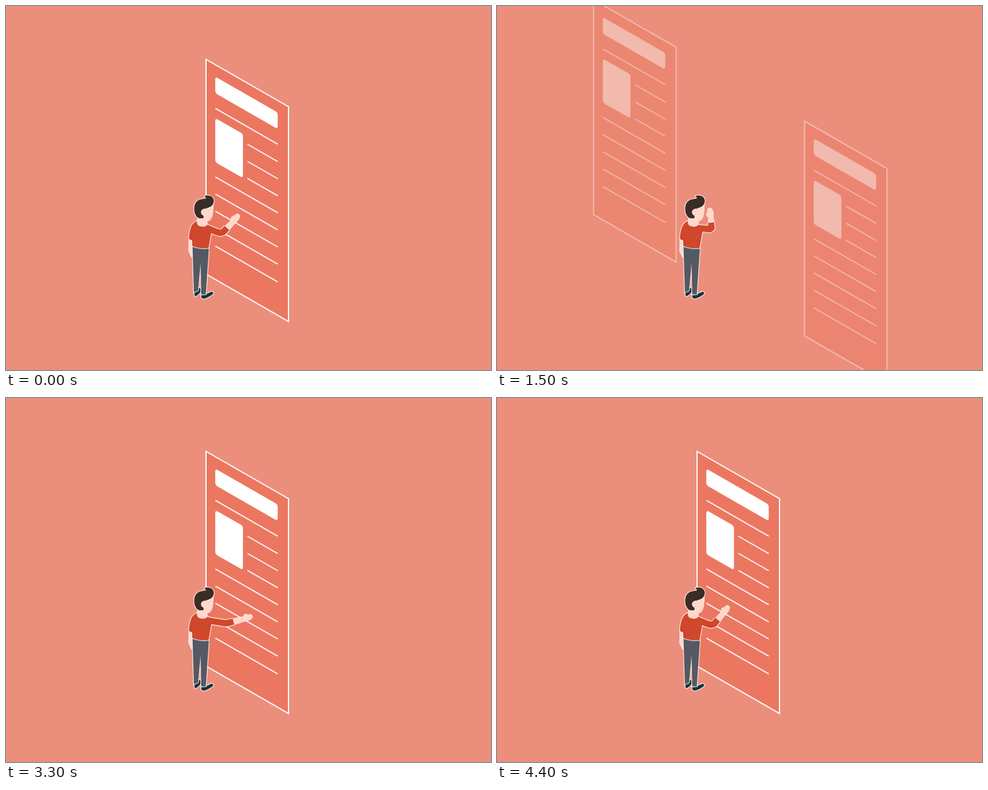
An HTML page that plays this animation: 800x600 px, repeating every 4500 ms.

```html
<!DOCTYPE html>
<html lang="en">
<head>
<meta charset="utf-8">
<title>Swiping pages</title>
<style>
  html, body { margin: 0; width: 100%; height: 100%; overflow: hidden; background: #eb8f7c; }
  svg { display: block; width: 100%; height: 100%; }
  .edge { stroke: #fff; stroke-opacity: .72; stroke-width: 2.6; stroke-linejoin: round; paint-order: stroke; }
  .sleeve { fill: none; stroke-linejoin: round; }
</style>
</head>
<body>
<svg viewBox="0 0 800 600">
  <defs>
    <g id="page" transform="matrix(1 .5735 0 1 330 88)">
      <path d="M0 0H136V354H0Z" fill="#eb7761" stroke="#fff" stroke-width="2" vector-effect="non-scaling-stroke"/>
      <rect x="15.2" y="19.7" width="103" height="27.3" rx="4" fill="#fff"/>
      <rect x="15.2" y="88" width="45.6" height="72.7" rx="4" fill="#fff"/>
      <g id="rules" stroke="#fff" stroke-opacity=".92" stroke-width="1.9" stroke-linecap="round"></g>
    </g>
  </defs>

  <use id="leaving" href="#page"/>
  <use id="coming" href="#page"/>

  <g>
    <path class="edge" fill="#ffd8cb" d="M302.5 384L302 404L306.5 413.5L308 412.5L307.5 386Z"/>
    <path class="edge" fill="#12343e" d="M310.3 473L317.5 464.5L321 465.5L321.3 471C318 475 315 478 311.8 478.6Z"/>
    <path class="edge" fill="#12343e" d="M322 476.5L330 475L339 471C342 470.5 342.5 474 340 476C335 479 330 482.5 325 482.3C322.5 481.8 321.8 479 322 476.5Z"/>
    <path class="edge" fill="#545963" d="M307.5 395C316 399 326 400 334.7 399L329.6 475.3L322 475.6L321 424L316.8 469L310 472Z"/>
    <path id="forearm" class="edge" fill="#ffd8cb"/>
    <path id="sleeveEdge" class="sleeve" stroke="#fff" stroke-opacity=".72" stroke-width="13"/>
    <path class="edge" fill="#d0472b" d="M315 354.5C306 357 302 370 302 384.5L307 386.5L307.2 395.5C316 399 326 400 334 399L338.5 374L341 366L331.5 359.5Z"/>
    <path id="sleeve" class="sleeve" stroke="#d0472b" stroke-width="10.4"/>
    <path class="edge" fill="#ffd8cb" d="M316 355L317 349L323 332L341 325C341.5 338 340 352 333 353.5L331 354L331.5 360C328 364 318 363.500 316 358Z"/>
    <path class="edge" fill="#3a2d27" d="M318.500 350C309 346 308 328 315 322C320 317.500 326 318.500 330 317L327.500 313C334 311 343 313.500 342.800 322C342 331 334 332 329.500 334C321 334 319 342 326 346L325.500 350Z"/>
    <path fill="#ffd8cb" d="M317 355L319 350.500L326 350L326 345.500C319.500 343 320.500 334.500 328 334.500L334 333L334 353L331 354L331.500 360C328 363.500 319 363 316.500 358Z"/>
  </g>
</svg>
<script>
const LOOP = 4500, STEP = 100;
const TRAVEL = 236, SLOPE = .5745;
const $ = id => document.getElementById(id);
const clamp = v => Math.min(1, Math.max(0, v));
const ramp = (a, b, t) => clamp((t - a) / (b - a));

// Smooth monotone curve through rows of [x, v1, v2, ...].
function track(keys, x, col = 1) {
  const last = keys.length - 1;
  x = Math.min(keys[last][0], Math.max(keys[0][0], x));
  const secant = i => (keys[i + 1][col] - keys[i][col]) / (keys[i + 1][0] - keys[i][0]);
  const slope = i => {
    if (i === 0 || i === last) return 0;
    const a = secant(i - 1), b = secant(i);
    return a * b > 0 ? 2 * a * b / (a + b) : 0;
  };
  let i = 0;
  while (i < last - 1 && x > keys[i + 1][0]) i++;
  const h = keys[i + 1][0] - keys[i][0], u = (x - keys[i][0]) / h, v = 1 - u;
  return keys[i][col] * v * v * (1 + 2 * u) + keys[i + 1][col] * u * u * (3 - 2 * u)
    + h * u * v * (slope(i) * v - slope(i + 1) * u);
}

const swipes = [
  { start: 1000, out: [[1000, 0], [1765, 1]], fadeOut: [1050, 1765], into: [[1264, 0], [1989, 1]] },
  { start: 3300, out: [[3300, 0], [3800, .553], [3900, .673], [4310, 1]], fadeOut: [3340, 4310], into: [[3577, 0], [4302, 1]] }
];

// How far the arm is reaching: 0 curled, 4 stretched out.
const reach = [
  [-600, 0], [-100, 1.9], [0, 2], [600, 4], [870, 4], [1000, 3], [1450, 0], [1530, 0],
  [1800, 1], [2500, 4], [3200, 4], [3300, 3.5], [3800, 0], [3900, 0], [4400, 1.9], [5100, 4]
];

// reach, elbow x, elbow y, fingertip x, fingertip y
const poses = [
  [0, 354, 368, 351.5, 334], [1, 356, 369, 361.5, 336.5], [2, 357, 374, 384, 345],
  [3, 362, 371, 399, 357], [4, 366, 371.5, 409, 362]
];

function place(el, x, opacity) {
  el.setAttribute("transform", `translate(${x} ${x * SLOPE})`);
  el.setAttribute("opacity", opacity);
}

function drawPages(t) {
  const s = swipes.filter(w => t >= w.start).pop();
  if (!s) {
    place($("leaving"), 0, 0);
    place($("coming"), 0, 1);
    return;
  }
  place($("leaving"), -TRAVEL * track(s.out, t), 1 - ramp(...s.fadeOut, t));
  const [[a], [b]] = s.into;
  place($("coming"), TRAVEL * (1 - track(s.into, t)), clamp(1.17 * ramp(a, b, t)));
}

function drawArm(t) {
  const r = track(reach, t);
  const [ex, ey, tx, ty] = [1, 2, 3, 4].map(c => track(poses, r, c));
  const len = Math.hypot(tx - ex, ty - ey);
  const cx = (tx - ex) / len, cy = (ty - ey) / len;
  const at = (x, y) => `${(ex + cx * x - cy * y).toFixed(2)} ${(ey + cy * x + cx * y).toFixed(2)}`;
  const tip = (x, y) => at(len + x, y);

  $("forearm").setAttribute("d",
    `M${at(8, -4.2)}L${tip(-13, -2.8)}C${tip(-12, -6.5)} ${tip(-8, -7.2)} ${tip(-6.5, -4)}`
    + `L${tip(-2, -3.6)}C${tip(1, -3)} ${tip(.8, 1.6)} ${tip(-1.5, 2.2)}`
    + `C${tip(-5, 4.6)} ${tip(-9, 4.2)} ${tip(-13, 3.6)}L${at(8, 4.6)}Z`);

  const sleeve = `M333 366.5Q${ex - 10} ${ey - 1} ${ex - 3} ${ey}L${at(2, 0)}L${at(11, 0)}`;
  $("sleeve").setAttribute("d", sleeve);
  $("sleeveEdge").setAttribute("d", sleeve);
}

function draw(now) {
  const t = Math.floor(now % LOOP / STEP) * STEP;
  drawPages(t);
  drawArm(t);
}

const rule = (x, y) =>
  `<path d="M${x} ${y}H117.500" vector-effect="non-scaling-stroke"/>`;
$("rules").innerHTML =
  [72, 185, 213.2, 241.4, 269.7, 299].map(y => rule(16, y)).join("")
  + [100.7, 128.9, 157].map(y => rule(69, y)).join("");

let begin;
function tick(now) {
  begin ??= now;
  draw(now - begin);
  requestAnimationFrame(tick);
}
draw(0);
requestAnimationFrame(tick);
</script>
</body>
</html>
```
